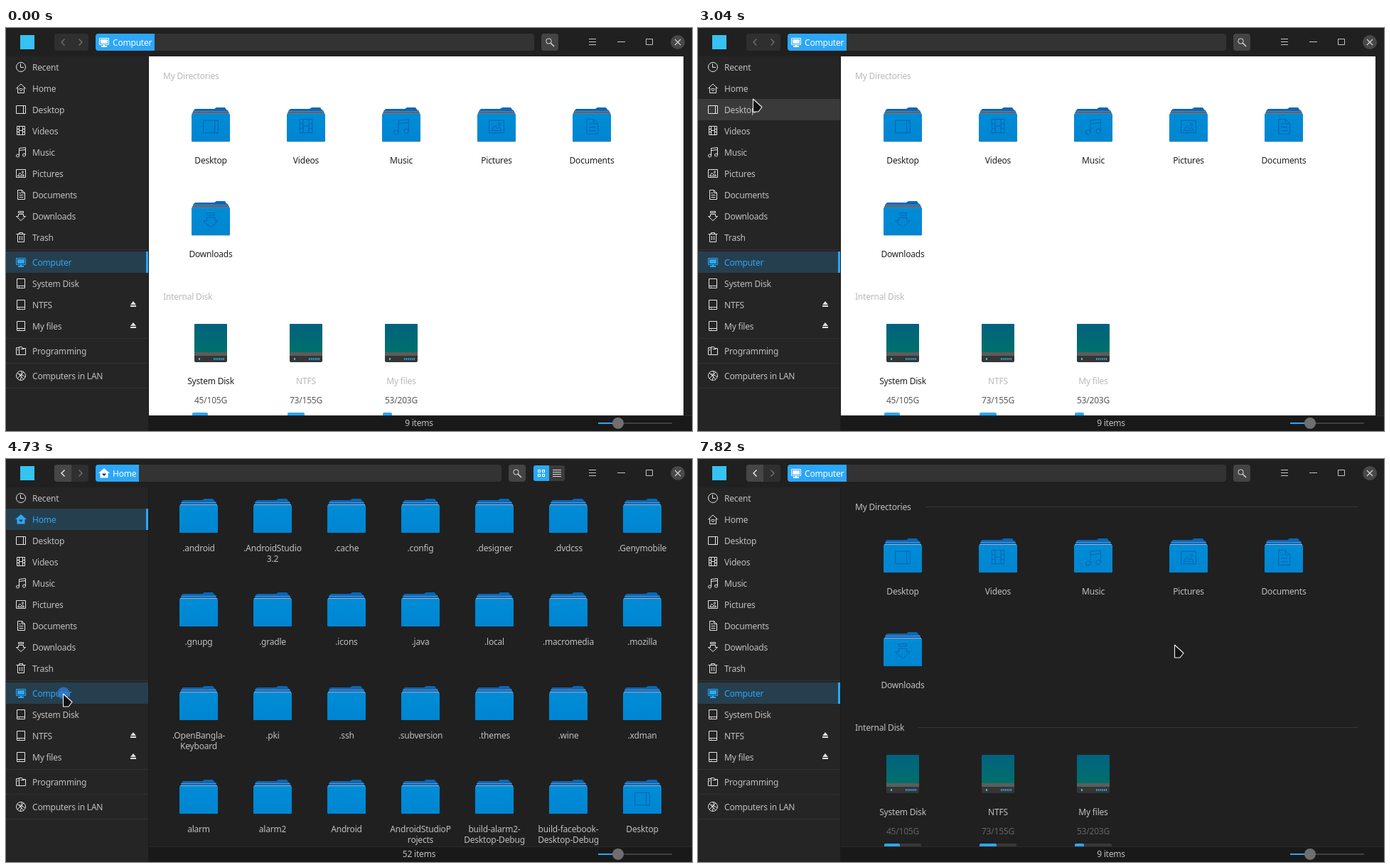
Write an HTML page that moves like this. It is 965 px wide and 568 px high and loops after 8000 ms.

```html
<!DOCTYPE html>
<html lang="en">
<head>
<meta charset="utf-8">
<title>File manager</title>
<style>
html, body { margin: 0; width: 100%; height: 100%; overflow: hidden; background: #202020; }
svg { display: block; width: 965px; height: 568px; }
text { font: 12px "Noto Sans", "Open Sans", sans-serif; letter-spacing: -.2px; white-space: pre; }
.i { fill: none; stroke: currentColor; vector-effect: non-scaling-stroke; }
</style>
</head>
<body>
<svg id="stage" viewBox="0 0 965 568" xmlns="http://www.w3.org/2000/svg"></svg>
<script>
const LOOP = 8000, BLUE = '#2ca7f8', GREY = '#c0c0c0', PICKED = '#263f4f';
const stage = document.getElementById('stage');

const rect = (x, y, w, h, fill, rx = 0) =>
  `<rect x="${x}" y="${y}" width="${w}" height="${h}" fill="${fill}" rx="${rx}"/>`;
const text = (x, y, s, fill = GREY, anchor = 'start') =>
  `<text x="${x}" y="${y}" fill="${fill}" text-anchor="${anchor}">${s}</text>`;
const mid = (x, y, s, fill) => text(x, y, s, fill, 'middle');
const path = (d, fill, extra = '') => `<path d="${d}" fill="${fill}" ${extra}/>`;
const line = (d, color, w = 1) => path(d, 'none', `stroke="${color}" stroke-width="${w}"`);
const group = (id, body) => `<g id="${id}">${body}</g>`;

// Line icons, centred on the origin
const heart = 'M0 4L-2.5 1.4Q-2.4-.5 0 .8Q2.4-.5 2.5 1.4z';
const dot = (x, y, r) => `M${x - r} ${y}a${r} ${r} 0 1 0 ${2 * r} 0a${r} ${r} 0 1 0 ${-2 * r} 0`;
const ICONS = {
  recent: dot(0, 0, 6.5) + 'M-.5-4.5V.5H4',
  home: 'M-7 .5L0-6L7 .5M-4.5-1.5V6.5H4.5V-1.5' + heart,
  desktop: 'M-6.5-5.5h13v11h-13zM3.5-5.5v11',
  video: 'M-5.5-6.5h11v12h-11zM-2.5-6.5v12M2.5-6.5v12M-5.5-2.5h3M-5.5 1.5h3M2.5-2.5h3M2.5 1.5h3M-2.5-.5h5',
  music: 'M-2.5 5V-5.5L6.5-6.5V4M-2.5-2.5L6.5-3.5' + dot(-4.5, 5, 2) + dot(4.5, 4, 2),
  picture: 'M-6.5-5.5h13v11h-13zM-4.5 3.5L-1.5-1L1 2L2.5 .5L4.5 3.5z' + dot(2.5, -2, 1),
  doc: 'M-4.5-6.5H1.5L5.5-2.5V6.5H-4.5zM1.5-6.5V-2.5H5.5M-2.5-2.5H0M-2.5 .5H3.5M-2.5 3.5H3.5',
  down: 'M-3.5-6.5h7v2h-7zM-3.5-2.5h7V.5H6.5L0 6.5L-6.5 .5H-3.5z',
  trash: 'M-6.5-4.5h13M-4.5-4.5v11h9v-11M-2.5-4.5v-2h5v2M-1.5-2v6M1.5-2v6',
  computer: 'M-6.5-5.5h13v9h-13zM-4 5.5h8M0 3.5v2',
  disk: 'M-5.5-6.5h11v13h-11zM-5.5 3.5h11M-3 5h1',
  project: 'M-6.5-4.5h4v10h-4zM-2.5-3.5v-2h4l1 2h4v9h-9zM-4.5-2.5v2M-.5-2.5h5',
  network: dot(0, 0, 6.5) + 'M-5-4L4 5M4-5L-5 4M-3-2.5Q2-2 6 2M-1 6Q2 1 1-6'
};
const SOLID = {
  home: path('M0-7L8 0H5.500V6.500H-5.500V0H-8z', 'currentColor') + path(heart, PICKED),
  computer: line('M-6.500-5.500h13v9h-13z', 'currentColor')
    + path('M-5-4H5V2H-5zM-4 5h8v2h-8zM-1 4h2v1h-2z', 'currentColor')
};
const icon = (name, x, y, color, s = 1) =>
  `<g transform="translate(${x} ${y}) scale(${s})" color="${color}"><path class="i" d="${ICONS[name]}"/></g>`;
const solid = (name, x, y, color) =>
  `<g transform="translate(${x} ${y})" color="${color}">${SOLID[name]}</g>`;

// Sidebar
const ROWS = [
  [40, 'recent', 'Recent'], [70, 'home', 'Home'], [100, 'desktop', 'Desktop'],
  [130, 'video', 'Videos'], [160, 'music', 'Music'], [190, 'picture', 'Pictures'],
  [220, 'doc', 'Documents'], [250, 'down', 'Downloads'], [280, 'trash', 'Trash'],
  [315, 'computer', 'Computer'], [345, 'disk', 'System Disk'], [375, 'disk', 'NTFS'],
  [405, 'disk', 'My files'], [440, 'project', 'Programming'], [475, 'network', 'Computers in LAN']
];
const plainRow = ([y, name, label]) => icon(name, 21, y + 15, '#e6e6e6') + text(37, y + 20, label);
const pickedRow = ([y, name, label]) => rect(0, y, 200, 30, PICKED)
  + solid(name, 21, y + 15, BLUE) + text(37, y + 20, label, BLUE);
const bar = y => rect(197, y, 3, 30, BLUE);

function sidebar() {
  const rules = [312, 437, 472, 507].map(y => rect(0, y, 200, 1, '#323232')).join('');
  const eject = [389, 419].map(y =>
    path(`M175 ${y + 1}L179 ${y - 4}L183 ${y + 1}zM175 ${y + 2}h8v2h-8z`, '#e0e0e0')).join('');
  return rect(0, 40, 200, 528, '#252525') + rect(200, 40, 1, 528, '#1b1b1b') + rules
    + `<rect id="hover" width="200" height="30" fill="#3a3a3a"/>`
    + ROWS.map(plainRow).join('') + eject
    + group('pickHome', pickedRow(ROWS[1]) + bar(70))
    + group('pickComp', pickedRow(ROWS[9])) + group('compBar', bar(315));
}

// Title bar
function search(x) {
  return rect(x, 8, 24, 24, '#444', 4)
    + `<circle cx="${x + 10.5}" cy="18.500" r="3.700" fill="none" stroke="#e0e0e0"/>`
    + line(`M${x + 13.2} 21.200L${x + 18} 26`, '#e0e0e0', 1.4);
}
function address(w, seg, name, label) {
  return rect(126, 8, w, 24, '#333', 4)
    + path(`M130 8H${126 + seg}V32H130Q126 32 126 28V12Q126 8 130 8z`, BLUE)
    + solid(name, 138, 20, '#fff') + text(150, 25, label, '#fff');
}
function viewSwitch() {
  let s = rect(742, 9, 44, 22, '#3c3c3c', 3) + path('M745 9H764V31H745Q742 31 742 28V12Q742 9 745 9z', BLUE);
  for (const x of [748.5, 754.5]) for (const y of [15.5, 21.5])
    s += `<rect x="${x}" y="${y}" width="3" height="3" fill="none" stroke="#fff"/>`;
  return s + line('M769 15.500h12M769 18.500h12M769 21.500h12M769 24.500h12', '#ddd');
}
function titlebar() {
  const left = 'M82.500 15.500L78 20L82.500 24.500';
  return rect(0, 0, 965, 40, '#202020') + rect(20, 10, 20, 20, '#35c3f2')
    + rect(68, 8, 48, 24, '#2f2f2f', 4)
    + line(left, '#777', 1.2) + line('M102.500 15.500L107 20L102.500 24.500', '#777', 1.2)
    + group('back', path('M72 8H92V32H72Q68 32 68 28V12Q68 8 72 8z', '#464646') + line(left, '#f0f0f0', 1.4))
    + group('barComp', address(617, 83, 'computer', 'Computer') + search(753))
    + group('barHome', address(571, 61, 'home', 'Home') + search(707) + viewSwitch())
    + line('M820 15.500h10M820 19.500h10M820 23.500h10', '#c4c4c4')
    + line('M860 19.500h11M900.500 15.500h9v8h-9z', '#c4c4c4')
    + '<circle cx="945" cy="20" r="10" fill="#484848"/>'
    + line('M941 16l8 8M949 16l-8 8', '#d8d8d8', 1.1);
}

// Content
function folder(cx, y, light, mark) {
  const sheets = light
    ? rect(2, 5, 50, 1, '#7d8190') + rect(1, 7, 52, 2, '#6c6f78')
    : rect(3, 5, 48, 1, '#6f8fbf') + rect(1, 8, 52, 1, '#a3a9c8');
  return `<g transform="translate(${cx - 27} ${y})">`
    + (light ? rect(0, 10, 54, 39, '#00000038', 1) : '')
    + path('M2 9V5L5 2H32L35 0H47L49 3L52 5V9z', '#0768b7') + sheets
    + rect(0, 9, 54, 39, 'url(#blue)', 1)
    + (mark ? icon(mark, 27, 27, '#0563b2', 1.6) : '') + '</g>';
}
function drive(cx) {
  const x = cx - 23;
  let s = rect(x, 417, 46, 54, '#353535', 2) + rect(x, 417, 46, 41, 'url(#teal)', 1)
    + rect(x, 457, 46, 5, '#5c5c5c') + rect(x + 6, 465, 2, 3, '#35c3f2');
  for (let i = 0; i < 6; i++) s += rect(x + 27 + i * 2.7, 465, 1.5, 3, '#2aa7d8');
  return s;
}
function computerView(light) {
  const head = light ? '#b9b9b9' : GREY, name = light ? '#202020' : GREY;
  const size = light ? '#585858' : '#646464';
  let s = light ? rect(201, 40, 752, 506, '#fff')
    : rect(320, 67, 609, 1, '#353535') + rect(310, 378, 619, 1, '#353535');
  s += text(221, 72, 'My Directories', head) + text(221, 383, 'Internal Disk', head);
  [2, 3, 4, 5, 6, 7].forEach((r, i) => {
    const x = 288 + i % 5 * 134, y = 112 + (i > 4 ? 132 : 0);
    s += folder(x, y, light, ROWS[r][1]) + mid(x, y + 79, ROWS[r][2], name);
  });
  [['System Disk', '45/105G', 22], ['NTFS', '73/155G', 24], ['My files', '53/203G', 13]].forEach(([n, g, w], i) => {
    const x = 288 + i * 134;
    s += drive(x) + mid(x, 502, n, light && i ? '#b9b9b9' : name) + mid(x, 529, g, size)
      + (light ? '' : rect(x - 26, 542, 52, 6, '#383838', 2)) + rect(x - 26, 542, w, 6, BLUE, 2);
  });
  return s;
}
const FILES = ('.android .AndroidStudio|3.2 .cache .config .designer .dvdcss .Genymobile '
  + '.gnupg .gradle .icons .java .local .macromedia .mozilla '
  + '.OpenBangla-|Keyboard .pki .ssh .subversion .themes .wine .xdman '
  + 'alarm alarm2 Android AndroidStudioP|rojects build-alarm2-|Desktop-Debug '
  + 'build-facebook-|Desktop-Debug Desktop').split(' ');
const homeView = () => FILES.map((f, i) => {
  const x = 271 + i % 7 * 104, y = 56 + Math.floor(i / 7) * 132;
  return folder(x, y, false, f === 'Desktop' ? 'desktop' : '')
    + f.split('|').map((s, k) => mid(x, y + 74 + k * 15, s)).join('');
}).join('');

function statusbar() {
  return rect(201, 546, 764, 22, '#191919') + rect(201, 546, 764, 1, '#2b2b2b')
    + `<text id="status" y="561" fill="${GREY}" text-anchor="middle"></text>`
    + `<circle id="spin" r="1" fill="${BLUE}"/>`
    + rect(833, 556, 28, 2, BLUE) + rect(861, 556, 76, 2, '#404040')
    + '<circle cx="861" cy="557" r="8" fill="#6f6f6f"/>';
}

const gradient = (id, a, b) => `<linearGradient id="${id}" x2="0" y2="1">
  <stop stop-color="${a}"/><stop offset="1" stop-color="${b}"/></linearGradient>`;
stage.innerHTML = `<defs>${gradient('blue', '#008cd6', '#0085d1')}${gradient('teal', '#02627f', '#00706a')}
  <clipPath id="pane"><rect x="201" y="40" width="764" height="506"/></clipPath></defs>`
  + rect(0, 0, 965, 568, '#202020') + sidebar() + titlebar()
  + `<g clip-path="url(#pane)">${group('light', computerView(true))}${group('dark', computerView(false))}${group('files', homeView())}</g>`
  + statusbar()
  + '<circle id="ripple" fill="none" stroke="#3080d6" opacity=".75"/>'
  + '<path id="cursor" d="M0 0L12.500 11.500L7.500 18H0z" fill="#111" stroke="#f4f4f4" stroke-width="1.100" stroke-linejoin="round"/>';

const el = {};
stage.querySelectorAll('[id]').forEach(n => el[n.id] = n);
const show = (id, on) => { el[id].style.display = on ? '' : 'none'; };
const put = (n, attrs) => { for (const k in attrs) n.setAttribute(k, attrs[k]); };

// Pointer path: time, x, y
const KEYS = [
  [600, 434, 552], [760, 419, 440], [920, 390, 315], [1120, 364, 250], [1600, 364, 250], [1720, 360, 247],
  [1820, 360, 247], [1940, 294.5, 212], [2100, 190, 151], [2300, 118, 111], [2630, 87, 89],
  [2710, 86, 86], [2860, 82, 62], [3040, 77.5, 100], [3130, 76, 98], [3280, 74, 66],
  [3430, 74, 64], [3690, 71, 84], [3840, 71, 86], [3970, 68.5, 126], [4140, 73, 240],
  [4320, 79, 326], [4520, 79, 326], [4680, 80.5, 331], [5320, 80.5, 331],
  [5500, 125, 335], [5750, 245, 318], [6050, 329.5, 301], [6420, 329.5, 301], [6580, 321.5, 311],
  [6690, 321.5, 311], [6720, 321.5, 312], [7140, 321.5, 312], [7290, 352, 325],
  [7500, 505, 250], [7660, 625, 216], [7820, 670.5, 262], [8000, 670.5, 262]
];
function slope(i, c) {
  const a = KEYS[i - 1], k = KEYS[i], b = KEYS[i + 1];
  if (!a || !b || (k[c] - a[c]) * (b[c] - k[c]) <= 0) return 0;
  return (b[c] - a[c]) / (b[0] - a[0]);
}
function pointer(t) {
  let i = 0;
  while (i < KEYS.length - 2 && KEYS[i + 1][0] <= t) i++;
  const a = KEYS[i], b = KEYS[i + 1], d = b[0] - a[0];
  const u = Math.min(1, Math.max(0, (t - a[0]) / d)), v = 1 - u;
  return [1, 2].map(c => a[c] * v * v * (1 + 2 * u) + b[c] * u * u * (3 - 2 * u)
    + d * u * v * (v * slope(i, c) - u * slope(i + 1, c)));
}

const CLICKS = [[3830, 71, 86], [4690, 81, 330]], RIPPLE = 280;
const OPEN = 3840, LOADED = 4090, PRESS = 4690, LEAVE = 4780;

function render(t) {
  const home = t >= OPEN && t < LEAVE, loading = t >= OPEN && t < LOADED;
  show('light', t < OPEN);
  show('files', t >= LOADED && t < LEAVE);
  show('dark', t >= LEAVE);
  show('barHome', home);
  show('barComp', !home);
  show('back', t >= OPEN);
  show('pickHome', home);
  show('pickComp', !home || t >= PRESS);
  show('compBar', !home);

  el.status.textContent = loading ? 'Loading...' : home ? '52 items' : '9 items';
  put(el.status, { x: loading ? 597 : 581 });
  show('spin', loading);
  const a = (t - 3970) / 120;
  put(el.spin, { cx: 545 + 7.5 * Math.sin(a), cy: 557 - 7.5 * Math.cos(a) });

  const [x, y] = pointer(t);
  show('cursor', t >= 600);
  put(el.cursor, { transform: `translate(${x.toFixed(2)} ${y.toFixed(2)})` });
  const row = t >= 600 && x < 200 && ROWS.find(r => y >= r[0] && y < r[0] + 30);
  show('hover', row);
  if (row) put(el.hover, { y: row[0] });

  const click = CLICKS.find(c => t >= c[0] && t < c[0] + RIPPLE);
  show('ripple', click);
  if (click) {
    const p = (t - click[0]) / RIPPLE, outer = 8 + 4 * p, hole = 12 * p * p;
    put(el.ripple, { cx: click[1], cy: click[2], r: (outer + hole) / 2, 'stroke-width': outer - hole });
  }
}

const start = performance.now();
function tick() {
  render((performance.now() - start) % LOOP);
  requestAnimationFrame(tick);
}
tick();
</script>
</body>
</html>
```
